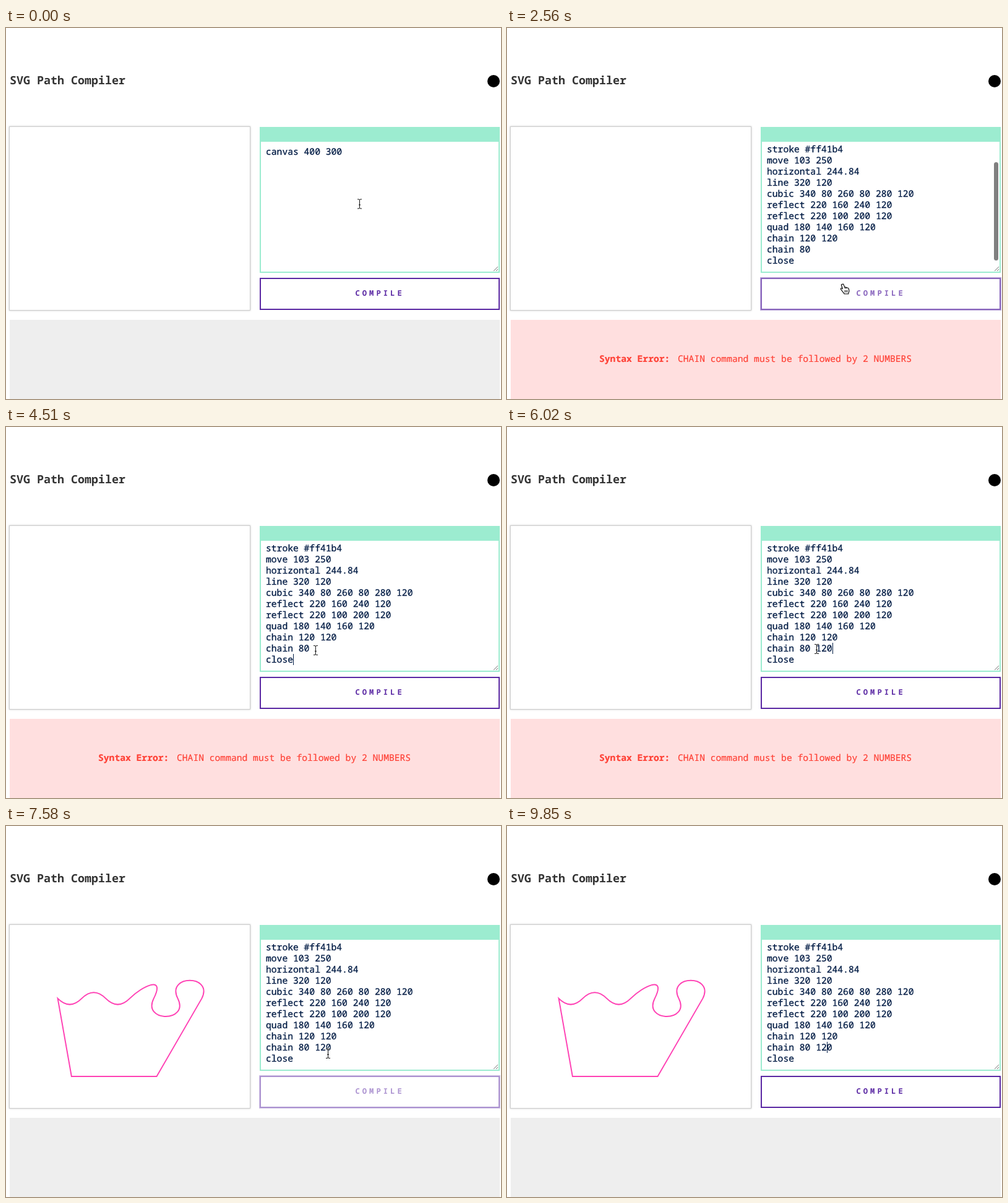
Animation of 800x600 px, one loop 9950 ms. Source, as an HTML page:

```html
<!DOCTYPE html>
<html lang="en">
<head>
<meta charset="utf-8">
<title>SVG Path Compiler</title>
<style>
html, body { margin: 0; width: 100%; height: 100%; overflow: hidden; background: #fff; }
svg { position: absolute; left: 0; top: 0; width: 800px; height: 600px; }
text { font-family: "Noto Sans Mono", "DejaVu Sans Mono", monospace; font-size: 14.667px; white-space: pre; text-rendering: geometricPrecision; }
.bold { font-weight: 700; }
#frame { position: absolute; left: 5px; top: 159px; width: 388px; height: 296px; border: 1px solid #ccc; box-shadow: 0 0 3px rgba(0, 0, 0, .22); }
</style>
</head>
<body>
<div id="frame"></div>
<svg viewBox="0 0 800 600">
  <defs><clipPath id="clip"><rect x="412" y="184" width="384" height="210"/></clipPath></defs>

  <text class="bold" x="6" y="91" fill="#333" style="font-size:18.333px">SVG Path Compiler</text>
  <circle cx="788" cy="86" r="10"/>

  <path id="shape" transform="translate(6 162.5) scale(.97)" fill="none" stroke="#ff41b4" stroke-width="2"
    d="M103 250H244.84L320 120C340 80 260 80 280 120S220 160 240 120S220 100 200 120Q180 140 160 120T120 120T80 120Z"/>

  <rect x="411" y="161" width="386" height="234" fill="#fff" stroke="#9cecd0" stroke-width="2"/>
  <rect x="410" y="160" width="388" height="24" fill="#9cecd0"/>
  <g clip-path="url(#clip)" fill="#001b44">
    <g id="code" stroke="#001b44" stroke-width=".3"></g>
    <rect id="caret" width="1" height="18"/>
  </g>
  <path d="M788 393l7-7M792 393l3-3" stroke="#777" fill="none"/>
  <rect id="thumb" x="787" y="217" width="7" height="159" rx="3.5" fill="#808080"/>

  <g id="button">
    <rect id="focus" x="409.5" y="403.5" width="389" height="53" fill="none" stroke="#5a28a3" stroke-dasharray="1 1"/>
    <rect x="411" y="405" width="386" height="50" fill="none" stroke="#5a28a3" stroke-width="2"/>
    <text class="bold" x="564.4" y="433" fill="#5a28a3" style="font-size:12.222px;letter-spacing:4px">COMPILE</text>
  </g>

  <rect id="panel" x="6" y="472" width="792" height="128"/>
  <g id="error" fill="#ff4136" stroke="#ff4136" stroke-width=".2">
    <text class="bold" x="149" y="540">Syntax Error:</text>
    <text x="276" y="540">CHAIN command must be followed by 2 NUMBERS</text>
  </g>

  <g id="mouse">
    <g id="beam" fill="none">
      <path d="M-3-7.5h1.5Q0-7.5 0-6Q0-7.5 1.5-7.5H3M0-6V6M-3 7.5h1.5Q0 7.5 0 6Q0 7.5 1.5 7.5H3" stroke="#fff" stroke-width="2.4" opacity=".7"/>
      <path d="M-3.5-7.5h2Q0-7.5 0-6Q0-7.5 1.5-7.5H3.5M0-6V6M-3.5 7.5h2Q0 7.5 0 6Q0 7.5 1.5 7.5H3.5M-1.5 1.5h3" stroke="#111"/>
    </g>
    <g id="hand" transform="translate(-5.5 -1)" stroke="#000" stroke-linejoin="round">
      <path fill="#fff" stroke-width="1.1" d="M4 1.5q1.3-1 2 .4l1.7 4.3q1.6-.6 2 .5q1.6-.5 2 .6q2-.3 2.4 1.2l.8 3q.3 2-1 3.5v2h-7l-.5-1.5q-2-1.5-3-3.6l-2-2.6q-.5-1.4 1-1.6q1 0 2 1.3l-2-6q-.4-1 .6-1.5z"/>
      <path fill="none" stroke-width=".9" d="M8 11v3.5M10 11v3.5M12 11v3.5M7.7 6.2l.7 2.4M9.8 6.7l.5 2"/>
    </g>
    <path id="arrow" d="M0 0V15L3.5 11.7L5.8 17L8.2 16L5.9 10.8H11Z" stroke="#fff"/>
  </g>
</svg>
<script>
const LOOP = 9950, BLINK = 500, FADE = 110, KEY = 120, PRESS = 130;
const LINE = 18, CHAR = 8.8, SCROLL = 40;

// Moments of the session, in ms
const PASTE = 1840, FAIL = 2530, EDIT = 3260, PICK = 4570, TYPE = 5430, PASS = 6630, BACK = 7690, LEAVE = 9390;

const script = `canvas 400 300

stroke #ff41b4
move 103 250
horizontal 244.84
line 320 120
cubic 340 80 260 80 280 120
reflect 220 160 240 120
reflect 220 100 200 120
quad 180 140 160 120
chain 120 120
chain 80
close`.split('\n');
const LAST = script.length - 1;

// Pointer moves: start, end, x, y
const moves = [
  [1990, 2400, 543.5, 414], [2650, 3040, 515.5, 370], [3670, 3860, 500, 414],
  [3860, 4050, 499, 394], [4340, 4540, 500.5, 359], [6020, 6370, 511.5, 421],
  [6810, 7040, 503, 470], [7220, 7560, 520.5, 368], [9070, LEAVE, 540, 530]];

const $ = id => document.getElementById(id);
const show = (id, on) => { $(id).style.display = on ? '' : 'none'; };
const within = (t, a, b) => t >= a && t < b;
const clamp = p => Math.min(1, Math.max(0, p));
const smooth = p => p * p * (3 - 2 * p);
const pulse = (t, from, to) => clamp((t - from) / FADE) - clamp((t - to) / FADE);

const rows = script.map((line, i) => {
  const row = document.createElementNS('http://www.w3.org/2000/svg', 'text');
  row.setAttribute('x', 420);
  row.setAttribute('y', 205 + LINE * i);
  row.textContent = line;
  $('code').append(row);
  return row;
});

function pointer(t) {
  let x = 571.5, y = 284.5;
  for (const [from, to, tx, ty] of moves) {
    const p = smooth(clamp((t - from) / (to - from)));
    x += (tx - x) * p;
    y += (ty - y) * p;
  }
  return [x, y];
}

// Last caret action: time, column, row
function caretAt(t, typed) {
  if (t >= BACK) return [BACK, 11, LAST - 1];
  if (typed) return [TYPE + KEY * (typed - 2), 8 + typed, LAST - 1];
  if (t >= PICK) return [PICK, 8, LAST - 1];
  if (t >= EDIT) return [EDIT, 5, LAST];
  if (t >= PASTE) return [PASTE, 5, LAST];
  return [140, 0, 1];
}

function drawEditor(t, focused) {
  const pasted = t >= PASTE, scroll = pasted ? SCROLL : 0;
  const typed = t < TYPE ? 0 : Math.min(4, 2 + Math.floor((t - TYPE) / KEY));
  rows.forEach((row, i) => { row.style.display = pasted || i === 0 ? '' : 'none'; });
  rows[LAST - 1].textContent = script[LAST - 1] + ' 120'.slice(0, typed);
  $('code').setAttribute('transform', `translate(0 ${-scroll})`);
  $('thumb').style.opacity = pulse(t, PASTE, 2800);

  const [since, col, row] = caretAt(t, typed);
  show('caret', !focused && t >= since && (t - since) % (2 * BLINK) < BLINK);
  $('caret').setAttribute('x', Math.round(420 + CHAR * col));
  $('caret').setAttribute('y', 191 + LINE * row - scroll);
}

function drawButton(t, focused) {
  const dim = pulse(t, FAIL - 2 * PRESS, EDIT) + pulse(t, 3760, 3900)
    + pulse(t, PASS - 2 * PRESS, BACK) + pulse(t, 9130, 9250);
  const press = pulse(t, FAIL - PRESS, FAIL) + pulse(t, PASS - PRESS, PASS);
  $('button').style.opacity = 1 - .5 * dim + .3 * press;
  show('focus', focused);
}

function drawPointer(t) {
  const [x, y] = pointer(t);
  const onText = y < 396, onButton = within(y, 404, 456);
  $('mouse').setAttribute('transform', `translate(${x} ${y})`);
  show('mouse', t < LEAVE);
  show('beam', onText);
  show('hand', onButton);
  show('arrow', !onText && !onButton);
}

function draw(t) {
  const focused = within(t, FAIL - PRESS, EDIT) || within(t, PASS - PRESS, BACK);
  const failed = within(t, FAIL, PASS);
  drawEditor(t, focused);
  drawButton(t, focused);
  drawPointer(t);
  show('error', failed);
  show('shape', t >= PASS);
  $('panel').setAttribute('fill', failed ? '#ffdfdf' : '#eee');
}

let start;
function tick(now) {
  start ??= now;
  draw(Math.max(0, now - start) % LOOP);
  requestAnimationFrame(tick);
}
draw(0);
requestAnimationFrame(tick);
</script>
</body>
</html>
```
